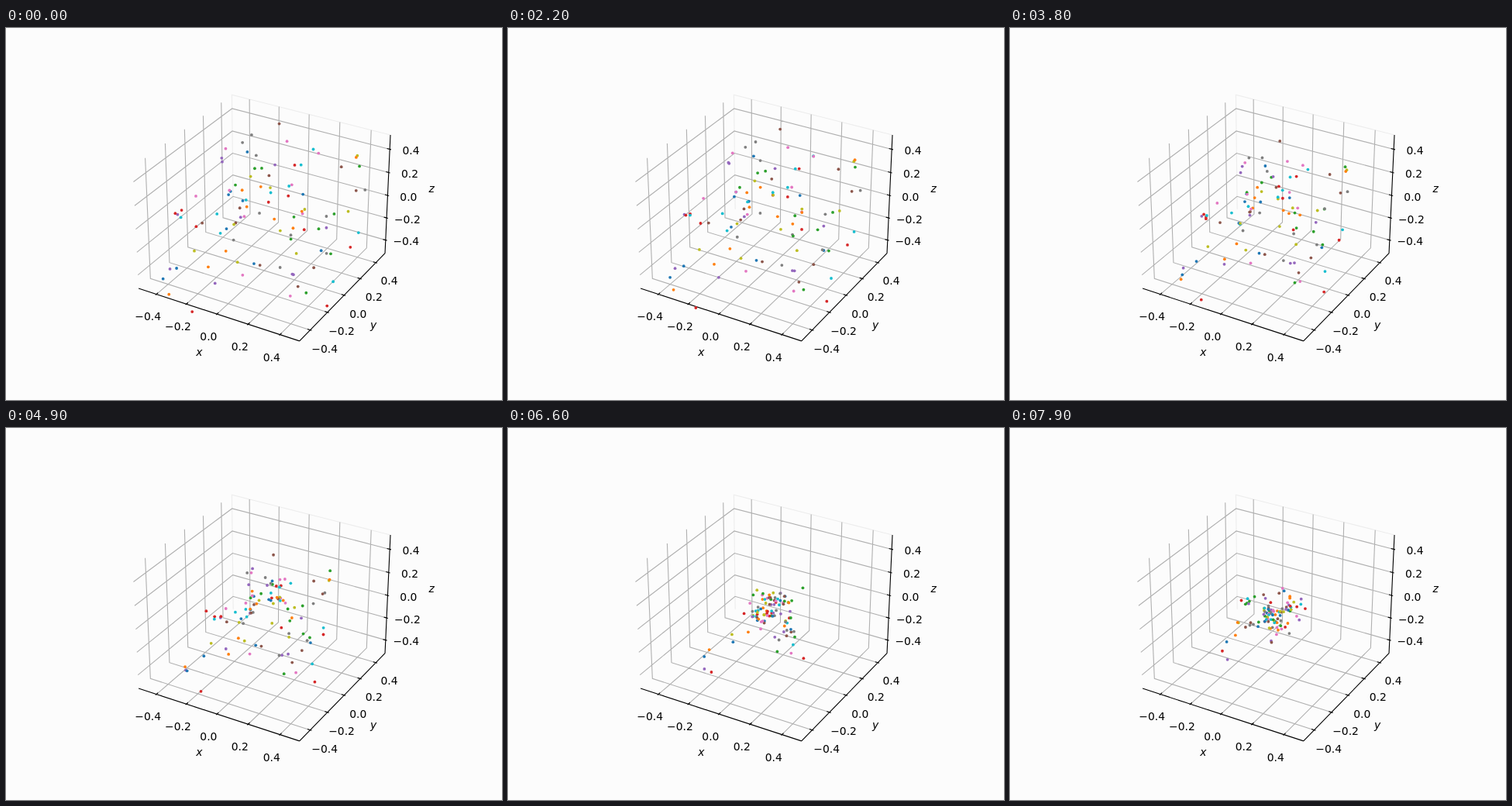
Animation, 640 px wide and 480 px high, one loop 8 s. Source, as an HTML page:

```html
<!DOCTYPE html>
<html lang="en">
<head>
<meta charset="utf-8">
<title>Collapsing particle cloud</title>
<style>
  html, body { margin: 0; width: 100%; height: 100%; overflow: hidden; background: #fcfcfc; }
  svg { display: block; width: 640px; height: 480px; }
  path { fill: none; stroke-width: 1.11; }
  text { font: 13.9px "DejaVu Sans", sans-serif; text-anchor: middle; }
  .name { font-style: oblique; }
</style>
</head>
<body>
<svg viewBox="0 0 640 480">
  <path id="edges" stroke="#ededed"/>
  <path id="grid" stroke="#b0b0b0"/>
  <path id="axes" stroke="#000"/>
  <g id="labels"></g>
  <g id="dots"></g>
</svg>
<script>
const $ = id => document.getElementById(id);

function add(parent, tag, attrs, text = '') {
  const el = document.createElementNS('http://www.w3.org/2000/svg', tag);
  for (const key in attrs) el.setAttribute(key, attrs[key]);
  el.textContent = text;
  parent.append(el);
  return el;
}

// Perspective view from azimuth -60°, elevation 30°, distance 10
const sin60 = Math.sqrt(3) / 2;
function project([px, py, pz]) {
  const x = px * 8 / 7, y = py * 8 / 7, z = pz * 6 / 7;
  const right = sin60 * x + y / 2;
  const up = -x / 4 + sin60 / 2 * y + sin60 * z;
  const scale = 1998 / (10 - sin60 / 2 * x + 0.75 * y - z / 2);
  return [333 + right * scale, 237.4 - up * scale];
}

const trace = (id, ...points) => $(id).setAttribute('d',
  ($(id).getAttribute('d') || '') + 'M' + points.map(project).join('L'));

// Text set off from an axis, outwards in the two other directions
function label(text, point, own, pad, drop, cls = '') {
  const [x, y] = project(point.map((c, i) => i === own ? c : c + Math.sign(c) * pad));
  add($('labels'), 'text', { x, y: y + drop, class: cls }, text);
}

const E = 25 / 48; // half the cube's side

// A grid line at value v runs wall edge, back edge, axis
const gridLines = [
  v => [[v, E, E], [v, E, -E], [v, -E, -E]],
  v => [[-E, v, E], [-E, v, -E], [E, v, -E]],
  v => [[-E, -E, v], [-E, E, v], [E, E, v]]
];

trace('edges', [-E, E, -E], [-E, E, E], [E, E, E]);
gridLines.forEach((line, own) => {
  for (let i = -2; i <= 2; i++) {
    const [wall, bend, end] = line(i / 5);
    const along = k => end.map((c, j) => c + k * (c - bend[j]));
    trace('grid', wall, bend, end);
    trace('axes', along(1 / 120), along(-1 / 60));
    label((i < 0 ? '−' : '') + Math.abs(i / 5).toFixed(1), end, own, 0.09, 10.5);
  }
  trace('axes', line(-E)[2], line(E)[2]);
  label('xyz'[own], line(0)[2], own, 0.19, 4, 'name');
});

const colours = ['#1f77b4', '#ff7f0e', '#2ca02c', '#d62728', '#9467bd',
  '#8c564b', '#e377c2', '#7f7f7f', '#bcbd22', '#17becf'];
const count = 100, frames = 80, substeps = 5;
const gravity = 0.0072 / count, softening = 0.035, dt = 0.1 / substeps;
const heart = [0.02, 0, -0.02];

let seed = 7;
const random = () => (seed = seed * 16807 % 2147483647) / 2147483647;

// Bodies at rest, spread evenly through the cube and balanced about its heart
const bodies = Array.from({ length: count }, (_, i) => ({
  pos: heart.map(() => random() - 0.5),
  vel: [0, 0, 0],
  dot: add($('dots'), 'circle', { r: 1.9, fill: colours[i % 10] }),
  path: []
}));
heart.forEach((h, k) => {
  const mean = bodies.reduce((sum, b) => sum + b.pos[k], 0) / count;
  for (const b of bodies) b.pos[k] += h - mean;
});

function attract(a, b) {
  const d = a.pos.map((c, k) => b.pos[k] - c);
  const r2 = d[0] ** 2 + d[1] ** 2 + d[2] ** 2 + softening ** 2;
  const pull = gravity * dt / (r2 * Math.sqrt(r2));
  for (let k = 0; k < 3; k++) {
    a.vel[k] += pull * d[k];
    b.vel[k] -= pull * d[k];
  }
}

function step() {
  for (let i = 0; i < count; i++)
    for (let j = 0; j < i; j++) attract(bodies[i], bodies[j]);
  for (const b of bodies)
    for (let k = 0; k < 3; k++) b.pos[k] += b.vel[k] * dt;
}

// Let the cloud fall together under its own gravity, noting every 100 ms
for (let f = 0; f < frames; f++) {
  for (const b of bodies) b.path.push(project(b.pos));
  for (let s = 0; s < substeps; s++) step();
}

const begin = performance.now();
function loop() {
  const frame = Math.floor((performance.now() - begin) / 100) % frames;
  for (const { dot, path } of bodies) {
    dot.setAttribute('cx', path[frame][0]);
    dot.setAttribute('cy', path[frame][1]);
  }
  requestAnimationFrame(loop);
}
loop();
</script>
</body>
</html>
```
